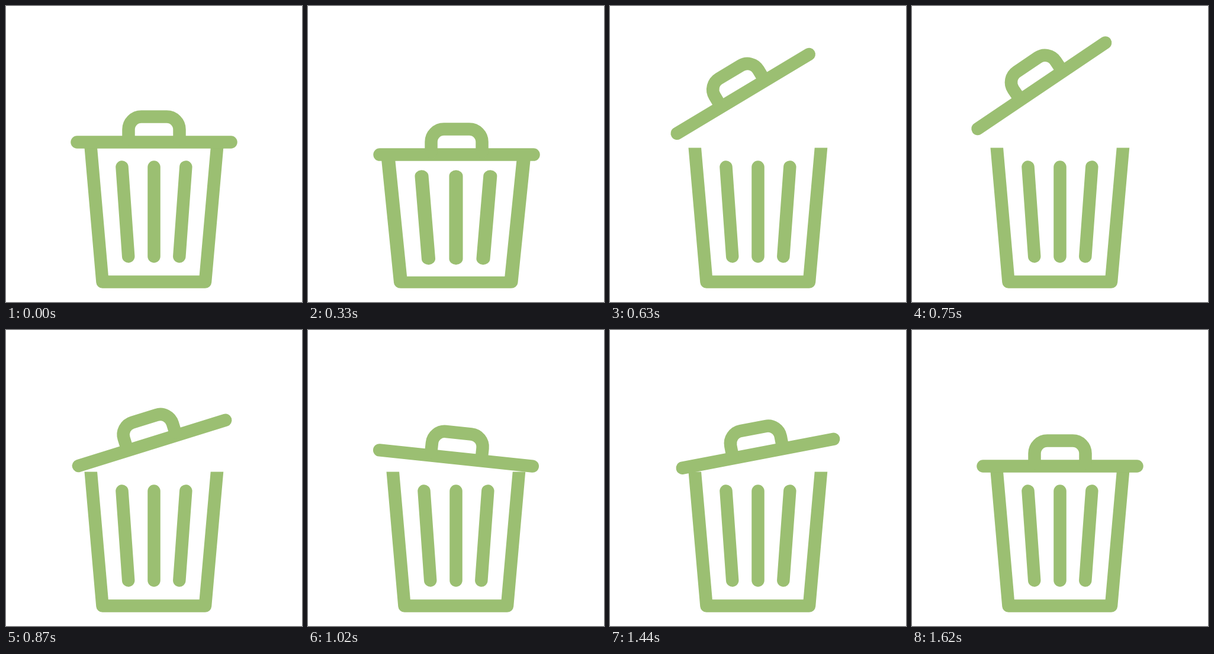
An HTML page for the animation above (1.8 s loop, 500 px wide and 500 px high).

```html
<!DOCTYPE html>
<html lang="en">
<head>
<meta charset="utf-8">
<title>Bin</title>
<style>
  html, body { margin: 0; width: 100%; height: 100%; overflow: hidden; background: #fff; }
  svg { display: block; width: 100%; height: 100%; }
  g { fill: none; stroke: #9bbf72; stroke-width: 21.5; stroke-linecap: round; stroke-linejoin: round; }
</style>
</head>
<body>
<svg viewBox="0 0 500 500">
  <clipPath id="rim"><rect x="100" y="239.5" width="300" height="250"/></clipPath>
  <g id="bin">
    <path clip-path="url(#rim)" d="M141.6 220 L163 466 H336.5 L358.2 220"/>
    <path d="M196 272 L206.7 423 M250 272 V423 M303.8 272 L292.8 423"/>
  </g>
  <g id="lid">
    <path d="M120 230 H380"/>
    <path d="M207 225 V208.5 A21.5 21.5 0 0 1 228.5 187 H271.5 A21.5 21.5 0 0 1 293 208.5 V225"/>
  </g>
</svg>
<script>
const LOOP = 1800, STEP = 30;
const bin = document.getElementById('bin');
const lid = document.getElementById('lid');

const progress = (t, from, to) => Math.min(1, Math.max(0, (t - from) / (to - from)));
const smooth = u => u * u * (3 - 2 * u);
const easeOut = (u, power) => 1 - (1 - u) ** power;
const mix = (a, b, u) => a + (b - a) * u;

// Lid poses: x, y, angle
const REST = [0, 0, 0], LOW = [1.4, 28.4, 0], HIGH = [-31.2, -95.3, -34];

// Each part of a pose eases with its own power, which bends the path.
const fly = (a, b, u, powers) => a.map((v, i) => mix(v, b[i], easeOut(u, powers[i])));

// Tip onto one side of the rim and back.
function rock(u, angle, lift) {
  const wave = Math.sin(Math.PI * u) ** 1.33;
  return [0, -lift * wave, angle * wave];
}

function lidPose(t) {
  if (t < 390) return LOW.map(v => v * smooth(progress(t, 210, 390)));
  if (t < 750) return fly(LOW, HIGH, progress(t, 390, 750), [1.55, 2, 2.2]);
  if (t < 960) return fly(HIGH, REST, progress(t, 750, 960), [2.6, 1.05, 0.8]);
  if (t < 1200) return rock(progress(t, 960, 1200), 9.5, 21.4);
  if (t < 1620) return rock(progress(t, 1200, 1620), -11.2, 22);
  return REST;
}

function draw(t) {
  const s = 0.1 * (smooth(progress(t, 210, 390)) - smooth(progress(t, 390, 570)));
  bin.setAttribute('transform', `translate(250 477) scale(${1 + s} ${1 - s}) translate(-250 -477)`);
  const [x, y, angle] = lidPose(t);
  lid.setAttribute('transform', `translate(${x} ${y}) rotate(${angle} 250 230)`);
}

const start = performance.now();
function tick() {
  const t = (performance.now() - start) % LOOP;
  draw(Math.floor(t / STEP) * STEP);
  requestAnimationFrame(tick);
}
tick();
</script>
</body>
</html>
```
